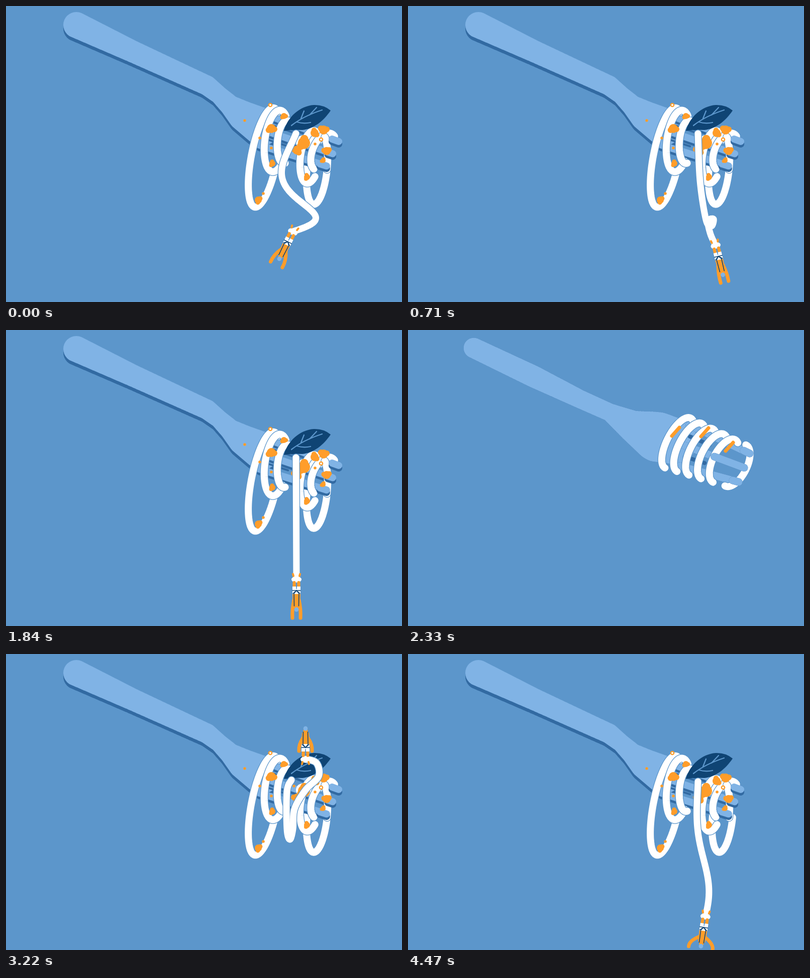
Write an HTML page with a canvas that moves like this. It is 788 by 592 pixels and loops after 4510 ms.

```html
<!DOCTYPE html>
<html lang="en">
<head>
<meta charset="utf-8">
<title>Fork jump</title>
<style>
html, body { margin: 0; width: 100%; height: 100%; overflow: hidden; background: #5c96cb; }
canvas { display: block; }
</style>
</head>
<body>
<canvas id="stage" width="788" height="592"></canvas>
<script>
const LOOP = 4510, STEPS = 64;
const SKY = '#5c96cb', LIGHT = '#80b3e5', SHADE = '#326aa2', WHITE = '#fff', ORANGE = '#ff9d2a', NAVY = '#0f4474';
const g = document.getElementById('stage').getContext('2d');
g.lineCap = g.lineJoin = 'round';

const { sin, cos, exp, abs, min, max, floor, PI } = Math;
const clamp = (v, lo, hi) => max(lo, min(hi, v));
const mix = (a, b, k) => Array.isArray(a) ? a.map((v, i) => mix(v, b[i], k)) : a + (b - a) * k;
const spline = (a, b, c, d, u) =>
  b + u * (c - a + u * (2 * a - 5 * b + 4 * c - d + u * (3 * (b - c) + d - a))) / 2;

// Every curve becomes a flat x, y list of equal length, so any two can be mixed.
const sample = f => Array.from({ length: STEPS + 1 }, (_, n) => f(n / STEPS)).flat();

// Smooth curve through a few points.
function curve(...p) {
  const last = p.length / 2 - 1;
  return sample(w => {
    const i = min(floor(w * last), last - 1);
    return [0, 1].map(axis => {
      const q = j => p[2 * clamp(j, 0, last) + axis];
      return spline(q(i - 1), q(i), q(i + 1), q(i + 2), w * last - i);
    });
  });
}

// Part of a tilted ellipse.
const arc = (cx, cy, rx, ry, tilt, from, to) => sample(w => {
  const a = mix(from, to, w), x = rx * cos(a), y = ry * sin(a);
  return [cx + x * cos(tilt) - y * sin(tilt), cy + x * sin(tilt) + y * cos(tilt)];
});

// Cord from the fork to the ankles; slack makes it an S.
const hang = (x, y, slack = 0) => sample(u => [
  mix(577, x, u) - slack * sin(2 * PI * u) * (.5 + u),
  mix(255, y, u) + slack * .8 * sin(PI * u)
]);

function trace(p) {
  g.beginPath();
  for (let i = 0; i < p.length; i += 2) g.lineTo(p[i], p[i + 1]);
}
function line(p, width, color) {
  trace(p);
  g.lineWidth = width;
  g.strokeStyle = color;
  g.stroke();
}
function fill(p, color) {
  trace(p);
  g.fillStyle = color;
  g.fill();
}
function oval(x, y, rx, ry = rx, color = ORANGE) {
  g.beginPath();
  g.ellipse(x, y, rx, ry, 0, 0, 7);
  g.fillStyle = color;
  g.fill();
}
function noodle(p, width = 14) {
  line(p, width + 2.5, SKY);
  line(p, width, WHITE);
}
function shifted(x, y, paint) {
  g.save();
  g.translate(x, y);
  paint();
  g.restore();
}

// Fork as circles [x, y, radius] joined into a tube: resting view and half-turned view.
const side = [[140,38,26], [250,90,22], [400,159,20], [424,178,18], [447,200,21], [472,220,30], [510,242,38]];
const flat = [[131,36,20.5], [250,93,22], [342,138,18.5], [402,165,18], [450,194,32], [497,214,50], [530,222,46]];

function tube(circles, color) {
  g.beginPath();
  circles.slice(1).forEach((next, i) => {
    for (let u = 0; u <= 1; u += .02) {
      const [x, y, r] = mix(circles[i], next, u);
      g.moveTo(x + r, y);
      g.arc(x, y, r, 0, 7);
    }
  });
  g.fillStyle = color;
  g.fill();
}

function prong(i, k, from, to) {
  const start = mix([530 - 13 * i, 222 + 28 * i], [560 - 10 * i, 190 + 41 * i], k);
  const end = mix([662 - 12 * i, 271 + 24.5 * i], [680 - 11 * i, 247 + 28.5 * i], k);
  return [...mix(start, end, from), ...mix(start, end, to)];
}
function drawTine(i, k, from) {
  const p = prong(i, k, from, 1), width = 14 + k;
  shifted(0, 5 * (1 - k), () => line(p, width, SHADE));
  line(p, width, LIGHT);
}
function drawFork(k) {
  const shape = mix(side, flat, k);
  shifted(0, 7 * (1 - k), () => tube(shape, SHADE));
  tube(shape, LIGHT);
  for (const i of [0, 1, 2]) drawTine(i, k, 0);
  for (const i of [.5, 1.5]) line(prong(i, k, .05, .38), 4 + 4 * k, SHADE);
}

// Half-turned loops sit evenly along the fork.
const turned = (i, from = -1.2, to = -4.7) => arc(537 + 23 * i, 226 + 9 * i, 22, 56 - 2 * i, .47, from, to);
const backNoodle = [arc(619, 325, 20, 72, .1, 0, PI), turned(3, -.9, -1.8)];
const noodles = [
  arc(514, 303, 26, 101, .19, -1.2, -6),
  arc(538, 270, 23, 62, .13, -1, -5.6),
  arc(556, 272, 16, 43, .08, -1.2, -4.9),
  arc(606, 302, 20, 53, .14, -1.3, -5.5),
  arc(632, 292, 22, 40, .4, -1.2, -4.5),
  arc(619, 325, 20, 72, .1, -1.1, 0)
].map((p, i) => [p, i < 5 ? turned(i) : turned(i, -1.6, 1.6)]);

const blobs = [
  [528,245,9], [553,220,6], [530,315,6], [502,388,7], [614,254,8], [632,248,9],
  [593,274,12], [579,288,9], [638,290,8], [631,309,5], [599,342,6]
];
const crumbs = [[505,264], [475,229], [528,284], [512,375], [615,276], [573,264]];
const rings = [[526,198], [627,267]];

function drawSauce(k) {
  if (k > .5) {
    for (const [x, y] of [[532, 203], [590, 204], [639, 233]]) line([x + 8, y - 8, x - 7, y + 9], 7, ORANGE);
    return;
  }
  shifted(20 * k, -40 * k, () => {
    for (const [x, y, r] of blobs) {
      oval(x, y, r);
      for (const a of [x, x + 2.4]) oval(x + r * .7 * cos(a), y + r * .7 * sin(a), r * .65);
    }
    for (const [x, y] of crumbs) oval(x, y, 2.8);
    for (const [x, y] of rings) {
      oval(x, y, 4.3);
      oval(x, y, 2, 2, WHITE);
    }
  });
}

const leaf = new Path2D('M553 250C560 222 585 200 612 198Q632 197 646 209C632 230 612 246 590 248Q568 247 553 250Z');
const veins = new Path2D('M568 239Q592 220 629 208M587 225L593 210M604 218L618 203M579 232Q592 236 606 233');
function drawLeaf(facing, bend) {
  if (facing <= 0) return;
  g.save();
  g.translate(600 + bend * 2, 224 + bend * 2 - 30 * (1 - facing));
  g.scale(1, facing);
  g.translate(-600, -224);
  g.fillStyle = NAVY;
  g.fill(leaf);
  g.lineWidth = 2.3;
  g.strokeStyle = SKY;
  g.stroke(veins);
  g.restore();
}

// Ankles at the origin, head along +y.
function drawJumper(x, y, [angle, flip, handX, handY]) {
  g.save();
  g.translate(x, y);
  g.rotate(angle);
  oval(0, 1, 10, 6.5, WHITE);
  g.scale(1, flip);
  for (const s of [-1, 1]) {
    line([s * 6, -6, s * 7, -10], 4, ORANGE);
    line([s * 4.5, 7, s * 4.5, 15], 6, ORANGE);
    g.beginPath();
    g.moveTo(s * 5, 42);
    g.quadraticCurveTo(s * (handX + 1), (40 + handY) / 2, s * handX, handY - 2);
    g.lineWidth = 7;
    g.strokeStyle = ORANGE;
    g.stroke();
  }
  fill([-8, 27, 8, 27, 7, 52, 3, 56, -3, 56, -7, 52], ORANGE);
  oval(0, 56, 4.5, 5);
  oval(0, 61, 4.3, 4.5, LIGHT);
  fill([-8, 15, -1, 15, 0, 20, 1, 15, 8, 15, 8, 30, -8, 30], WHITE);
  line([-8, 23, 8, 23], 1.5, NAVY);
  for (const s of [-1, 1]) line([s * -7, 29, 0, 23, s * 5, 29, s * 4.5, 54], 1.6, NAVY);
  line([0, 7, 0, 20], 1.3, SKY);
  g.restore();
}

// Pose: body angle, vertical flip, hand x, hand y, then the cord down to the ankles.
const pose = (angle, flip, handX, handY, cord) => [angle, flip, handX, handY, ...cord];
const pile = [568,252, 559,275, 559,350, 565,371, 571,350, 574,310];
const perch = curve(...pile, 596,272, 622,245, 618,218, 596,210);
const rest = pose(0, 1, 8, 80, hang(578, 498));
const stand = pose(0, -1, 13, 18, perch);
const low = pose(.15, 1, 24, 67, hang(592, 524, 8));

// Each rebound is weaker and on the other side.
const rebounds = [0, 1, 2, 3].map(n => {
  const d = (-.6) ** n;
  return [830 + 250 * n, pose(-.13 * d, 1, 10 + 4 * abs(d), 77,
    hang(578 + 22 * d, 498 + (d > 0 ? 12 : 55) * d, max(0, -40 * d)))];
});

const keys = [
  [0, pose(.46, 1, 13, 76, hang(571, 451, 35))],
  [300, pose(.1, 1, 14, 75, hang(594, 402, 42))],
  [540, pose(-.05, 1, 11, 77, hang(604, 446, 24))],
  [710, pose(-.24, 1, 8, 78, curve(577,255, 581,350, 593,428, 604,440, 608,426, 597,430, 602,456, 612,478))],
  ...rebounds,
  [1840, rest],
  [2090, rest],
  [2200, pose(-.5, 1, 8, 80, hang(642, 405, 10))],
  [2300, stand],
  [3530, stand],
  [3680, pose(0, -.75, 18, 28, perch)],
  [3910, pose(0, .95, 28, 36, curve(...pile, 598,275, 622,252, 612,228, 594,224))],
  [4040, pose(.05, 1, 20, 60, hang(597, 302, 35))],
  [4200, pose(.1, 1, 12, 74, hang(594, 440, 20))],
  [4330, pose(.12, 1, 16, 70, hang(589, 508, 8))],
  [4470, low],
  [LOOP, low]
];

function poseAt(t) {
  const i = clamp(keys.findIndex(k => k[0] > t) - 1, 0, keys.length - 2);
  const [start, now] = keys[i], [end, next] = keys[i + 1];
  if (now === next) return now;
  const before = keys[max(i - 1, 0)][1], after = keys[min(i + 2, keys.length - 1)][1];
  const u = (t - start) / (end - start);
  return now.map((v, j) => spline(before[j], v, next[j], after[j], u));
}

// Two full turns about the handle.
function turnAt(t) {
  if (t < 2090 || t > 2930) return 0;
  if (t < 2330) return PI * ((t - 2090) / 240) ** 1.6;
  return PI * (4 - 3 * (1 - (t - 2330) / 600) ** 1.5);
}

function draw(t) {
  const facing = cos(turnAt(t)), k = (1 - facing) / 2;
  const now = poseAt(t), cord = now.slice(4);
  g.fillStyle = SKY;
  g.fillRect(0, 0, 788, 592);

  shifted(7 * exp(-(((t - 4470) / 90) ** 2)), 0, () => noodle(mix(...backNoodle, k)));
  drawFork(k);
  if (k < .5) line([590, 272, 634, 259], 26 * (1 - k), WHITE);
  noodles.forEach(n => noodle(mix(...n, k)));
  drawTine(0, k, .9);
  drawTine(1, k, mix(.93, .5, k));
  drawTine(2, k, .9);
  drawSauce(k);
  drawLeaf(facing, max(0, 1 - abs(t - 3905) / 135));
  if (k < .5) {
    noodle(cord, 13);
    if (t < 2300 || t > 2800) drawJumper(...cord.slice(-2), now);
  }
}

function tick() {
  draw(performance.now() % LOOP);
  requestAnimationFrame(tick);
}
tick();
</script>
</body>
</html>
```
